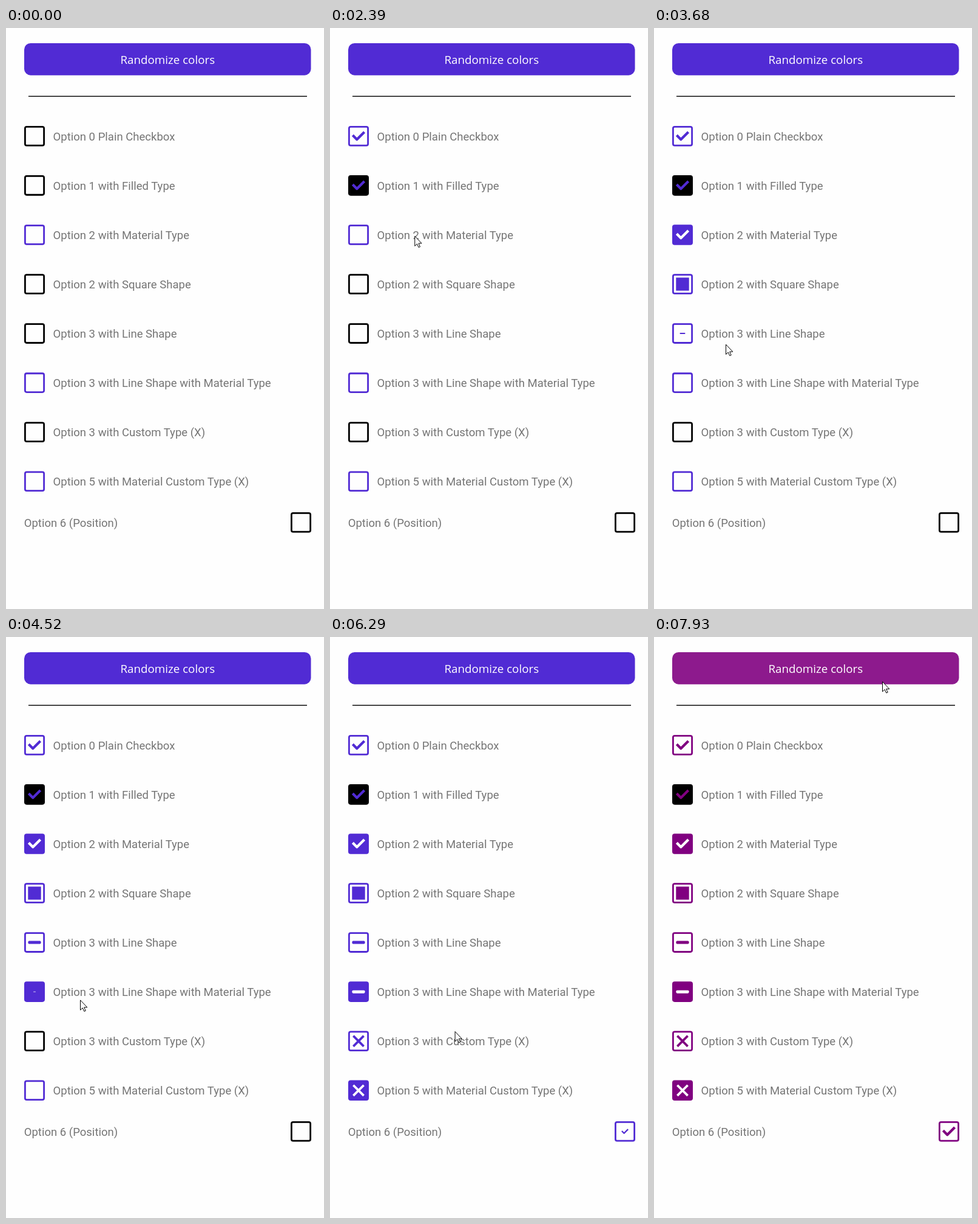
These frames come from a looping animation (524x955 px, 8000 ms). An HTML page:

```html
<!DOCTYPE html>
<html lang="en">
<head>
<meta charset="utf-8">
<title>Checkbox options</title>
<style>
  html, body { margin: 0; width: 100%; height: 100%; overflow: hidden; background: #fefefe; }
  svg { display: block; width: 524px; height: 955px; }
  text { font: 18.55px Roboto, sans-serif; fill: #757575; }
  #title { font: 18.75px "Open Sans", sans-serif; fill: #fff; text-anchor: middle; }
</style>
</head>
<body>
<svg viewBox="0 0 524 955">
  <clipPath id="clip"><rect x="30" y="25" width="472.5" height="52.7" rx="10.5"/></clipPath>
  <g clip-path="url(#clip)">
    <rect id="button" x="30" y="25" width="473" height="53"/>
    <circle id="ripple" cx="376" cy="73" fill="#fff" fill-opacity=".1"/>
  </g>
  <text id="title" x="266.3" y="58.5">Randomize colors</text>
  <rect x="37" y="111.6" width="459" height="1.4"/>
  <g id="rows"></g>
  <circle id="press" r="12" fill="#ffef00" fill-opacity=".52"/>
  <path id="cursor" d="M.5 .5V16.8L4.2 13.3L6.8 19L9.2 18L6.7 12.4H11.8Z" fill="#fff" stroke="#000"/>
</svg>
<script>
const LOOP = 8000, HOLD = 110, POP = 170, TRAVEL = .75;
const $ = id => document.getElementById(id);
const clamp = v => Math.max(0, Math.min(1, v));
const easeOut = k => k * (2 - k);

const glyphs = {
  check: '<path d="M-9.6 -1.6L-2.7 5.4L9.6 -6.9" fill="none" stroke="currentColor" stroke-width="4.2" stroke-linejoin="round"/>',
  square: '<rect x="-10.7" y="-10.7" width="21.4" height="21.4" fill="currentColor"/>',
  line: '<rect x="-10.6" y="-2.5" width="21.2" height="5" rx="1.8" fill="currentColor"/>',
  cross: '<path d="M-8.6 -8.6L8.6 8.6M8.6 -8.6L-8.6 8.6" stroke="currentColor" stroke-width="3.7"/>'
};

// label, glyph, style, click [time, x, y]
const options = [
  ['Option 0 Plain Checkbox', 'check', 'plain', [1080, 166, 178]],
  ['Option 1 with Filled Type', 'check', 'filled', [1840, 146, 255]],
  ['Option 2 with Material Type', 'check', 'material', [2680, 139, 345]],
  ['Option 2 with Square Shape', 'square', 'plain', [3050, 128, 422]],
  ['Option 3 with Line Shape', 'line', 'plain', [3500, 118, 501]],
  ['Option 3 with Line Shape with Material Type', 'line', 'material', [4380, 118, 582]],
  ['Option 3 with Custom Type (X)', 'cross', 'plain', [4940, 141, 664]],
  ['Option 5 with Material Custom Type (X)', 'cross', 'material', [5470, 143, 751]],
  ['Option 6 (Position)', 'check', 'plain', [6090, 154, 822]]
];
const entry = [190 - HOLD, 427, 796], recolor = [7180, 376, 73];
const clicks = [...options.map(o => o[3]), recolor];
const stops = [entry, ...clicks];

$('rows').innerHTML = options.map(([label, glyph], i) => {
  const last = i === options.length - 1;
  const cx = last ? 486 : 47, cy = last ? 812.8 : 177.8 + 81.07 * i;
  return `<text x="${last ? 29.7 : 77.5}" y="${cy + 7}">${label}</text>
    <g transform="translate(${cx} ${cy})">
      <rect x="-15.6" y="-15.4" width="31.2" height="30.8" rx="2.7" stroke-width="2.8"/>
      <g>${glyphs[glyph]}</g>
    </g>`;
}).join('');
const boxes = [...document.querySelectorAll('#rows > g')];

// After each click the cursor glides to the next one and waits there.
function cursorAt(t) {
  const i = stops.findLastIndex(s => t >= s[0]);
  const [t0, x0, y0] = stops[Math.max(0, i)];
  const [t1, x1, y1] = stops[Math.min(i + 1, stops.length - 1)];
  const leave = t0 + HOLD;
  const k = t1 > t0 ? easeOut(clamp((t - leave) / (t1 - leave) / TRAVEL)) : 0;
  return [x0 + (x1 - x0) * k, y0 + (y1 - y0) * k];
}

function draw(t) {
  const release = recolor[0] + HOLD;
  const accent = t < release + 80 ? '#512bd4' : '#800080';
  $('button').setAttribute('fill', accent);
  $('ripple').setAttribute('r', 390 * clamp((t - release) / 360));

  options.forEach(([, , style, [time]], i) => {
    const [box, mark] = boxes[i].children;
    const age = t - time - HOLD, on = age >= 0;
    const material = style === 'material', filled = style === 'filled';
    const edge = material || on && !filled ? accent : '#000';
    box.setAttribute('stroke', edge);
    box.setAttribute('fill', on && style !== 'plain' ? edge : 'none');
    mark.style.color = material ? '#fff' : accent;
    mark.setAttribute('transform', `scale(${clamp(age / POP)})`);
  });

  const pressed = clicks.some(([time]) => t >= time && t < time + HOLD);
  const show = (id, on) => {
    $(id).setAttribute('transform', `translate(${cursorAt(t)})`);
    $(id).setAttribute('visibility', on ? 'visible' : 'hidden');
  };
  show('cursor', t >= entry[0] + HOLD);
  show('press', pressed);
}

const begin = performance.now();
function tick() {
  draw((performance.now() - begin) % LOOP);
  requestAnimationFrame(tick);
}
tick();
</script>
</body>
</html>
```
